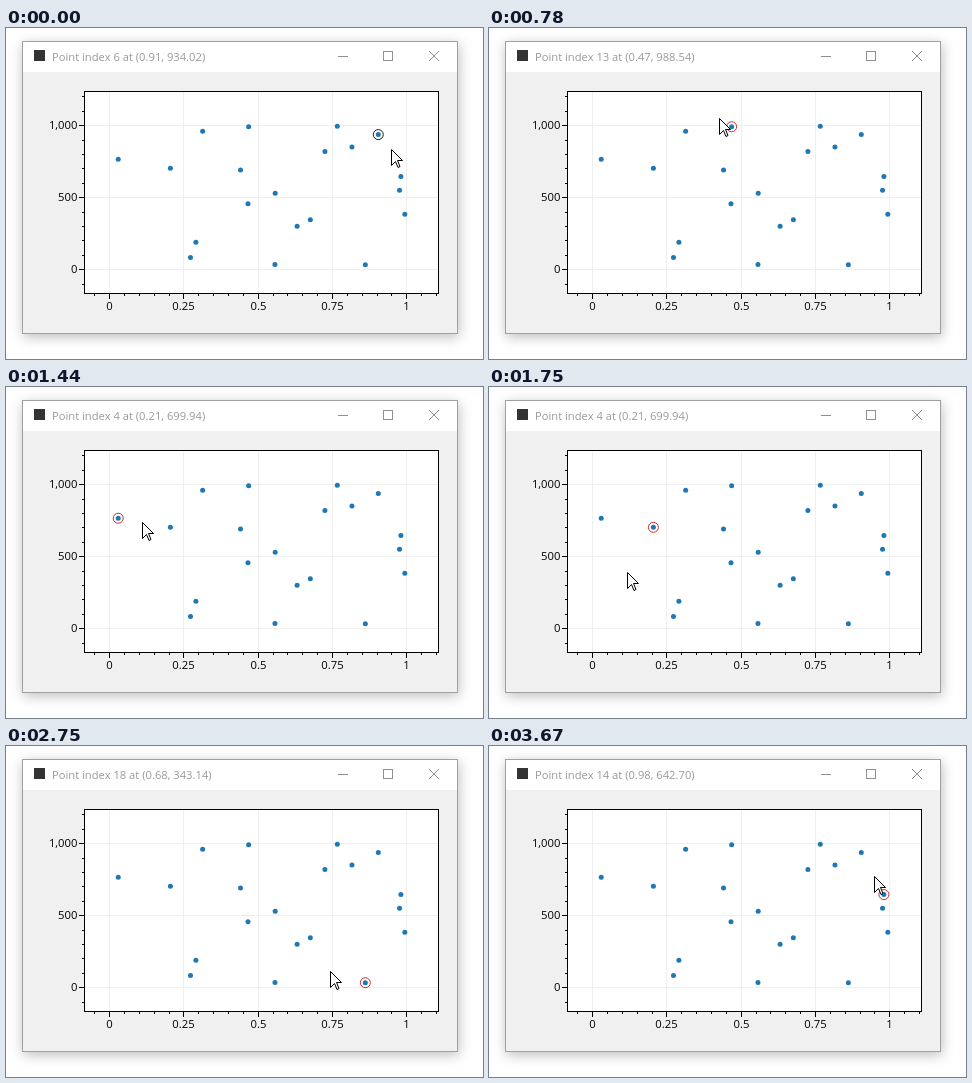
These frames come from a looping animation (477x331 px, 3.7 s). An HTML page:

```html
<!DOCTYPE html>
<html lang="en">
<head>
<meta charset="utf-8">
<title>Nearest point</title>
<style>
  html, body { margin: 0; width: 100%; height: 100%; overflow: hidden; background: #fff; }
  #win {
    position: absolute; left: 16px; top: 13px; width: 434px; height: 291px;
    border: 1px solid #a0a0a0; background: #f0f0f0;
    box-shadow: 1px 3px 12px rgba(0, 0, 0, .26);
  }
  svg { position: absolute; left: 0; top: 0; display: block; }
  text { font-family: "Open Sans", "Noto Sans", sans-serif; font-size: 11.3px; }
  #title { font-size: 11.2px; fill: #999; }
  .crisp { shape-rendering: crispEdges; }
</style>
</head>
<body>
<div id="win"></div>
<svg width="477" height="331" viewBox="0 0 477 331">
  <rect x="17" y="14" width="434" height="30" fill="#fff"/>
  <rect x="28" y="22" width="11" height="11" fill="#333"/>
  <text id="title" x="46" y="33"></text>
  <g fill="none" stroke="#909090">
    <path class="crisp" d="M332 28.5h10M377.5 23.5h9v9h-9z"/>
    <path d="M423 23l10 10M433 23l-10 10"/>
  </g>
  <rect x="78" y="63" width="355" height="203" fill="#fff"/>
  <g id="grid" class="crisp" stroke="#efefef"></g>
  <rect class="crisp" x="78.5" y="63.5" width="354" height="202" fill="none" stroke="#000"/>
  <g id="ticks" class="crisp" stroke="#000"></g>
  <g id="labels"></g>
  <g id="dots" fill="#1f77b4"></g>
  <circle id="ring" r="5" fill="none"/>
  <path id="cursor" fill="#fff" stroke="#000"
    d="M.5.5V16.5L4.5 12.5L7 18.5L9 17.5L6.5 11.5H11.5Z"/>
</svg>
<script>
const LOOP = 3700;
const HOLD = 50;
const TITLE_LAG = 30;
const COUNT = 20;

// Mouse key points: time, x, y
const path = [
  [0, 385, 121], [550, 296, 95], [780, 230, 90], [1440, 136, 135], [1670, 130, 175],
  [2180, 203, 223], [2750, 324, 225], [3160, 379, 189], [3670, 385, 130]
];

const $ = id => document.getElementById(id);
const px = x => 103.2 + 297 * x;
const py = y => 241.1 - .144 * y;
const snap = v => Math.round(v) + .5;

// Knuth's subtractive random generator, values in [0, 1)
function subtractiveRandom(seed) {
  const M = 2147483647, s = [];
  const sub = (a, b) => a < b ? a - b + M : a - b;
  let prev = 161803398 - seed, next = 1;
  s[55] = prev;
  for (let i = 1; i < 55; i++) {
    const k = 21 * i % 55;
    s[k] = next;
    next = sub(prev, next);
    prev = s[k];
  }
  for (let pass = 0; pass < 4; pass++)
    for (let i = 1; i <= 55; i++) s[i] = sub(s[i], s[1 + (i + 30) % 55]);
  let a = 0, b = 21;
  return () => {
    a = a % 55 + 1;
    b = b % 55 + 1;
    s[a] = sub(s[a], s[b]);
    return s[a] / M;
  };
}

const random = subtractiveRandom(0);
const xs = Array.from({ length: COUNT }, random);
const points = xs.map(x => [x, random() * 1000]);

function add(parent, tag, attrs, text = '') {
  const el = document.createElementNS('http://www.w3.org/2000/svg', tag);
  for (const key in attrs) el.setAttribute(key, attrs[key]);
  el.textContent = text;
  $(parent).append(el);
}

function drawAxes() {
  for (let i = -1; i <= 22; i++) {
    const x = snap(px(i / 20)), major = i % 5 === 0;
    add('ticks', 'path', { d: `M${x} 266v${major ? 5 : 2}` });
    if (!major) continue;
    add('grid', 'path', { d: `M${x} 64V265` });
    add('labels', 'text', { x, y: 282, 'text-anchor': 'middle' }, String(i / 20));
  }
  for (let i = -1; i <= 12; i++) {
    const y = snap(py(i * 100)), major = i % 5 === 0;
    add('ticks', 'path', { d: `M78 ${y}h${major ? -5 : -2}` });
    if (!major) continue;
    add('grid', 'path', { d: `M79 ${y}H432` });
    add('labels', 'text', { x: 71.5, y: y + 3.5, 'text-anchor': 'end' },
      (i * 100).toLocaleString('en-US'));
  }
}

function slope(i, axis) {
  const a = path[Math.max(i - 1, 0)], b = path[Math.min(i + 1, path.length - 1)];
  return (b[axis] - a[axis]) / (b[0] - a[0]);
}

// Cubic Hermite curve through the key points
function mouseAt(t) {
  const last = path.length - 1;
  t = t < HOLD ? 0 : Math.min(t, path[last][0]);
  let i = 0;
  while (i < last - 1 && t >= path[i + 1][0]) i++;
  const a = path[i], b = path[i + 1], span = b[0] - a[0];
  const u = (t - a[0]) / span, v = 1 - u;
  return [1, 2].map(k =>
    v * v * (1 + 2 * u) * a[k] + u * u * (1 + 2 * v) * b[k] +
    span * u * v * (v * slope(i, k) - u * slope(i + 1, k)));
}

function nearest([mx, my]) {
  const dist = ([x, y]) => Math.hypot(px(x) - mx, py(y) - my);
  return points.reduce((best, p, i) => dist(p) < dist(points[best]) ? i : best, 0);
}

function render(t) {
  const mouse = mouseAt(t);
  const [x, y] = points[nearest(mouse)];
  const ring = $('ring');
  ring.setAttribute('cx', px(x));
  ring.setAttribute('cy', py(y));
  ring.setAttribute('stroke', t < HOLD ? '#2a1a12' : '#c8302a');
  $('cursor').setAttribute('transform', `translate(${mouse.map(Math.round)})`);

  const n = nearest(mouseAt(t - TITLE_LAG));
  const [vx, vy] = points[n].map(v => v.toFixed(2));
  $('title').textContent = `Point index ${n} at (${vx}, ${vy})`;
}

drawAxes();
points.forEach(([x, y]) => add('dots', 'circle', { cx: px(x), cy: py(y), r: 2.5 }));

const start = performance.now();
function tick() {
  render((performance.now() - start) % LOOP);
  requestAnimationFrame(tick);
}
tick();
</script>
</body>
</html>
```
